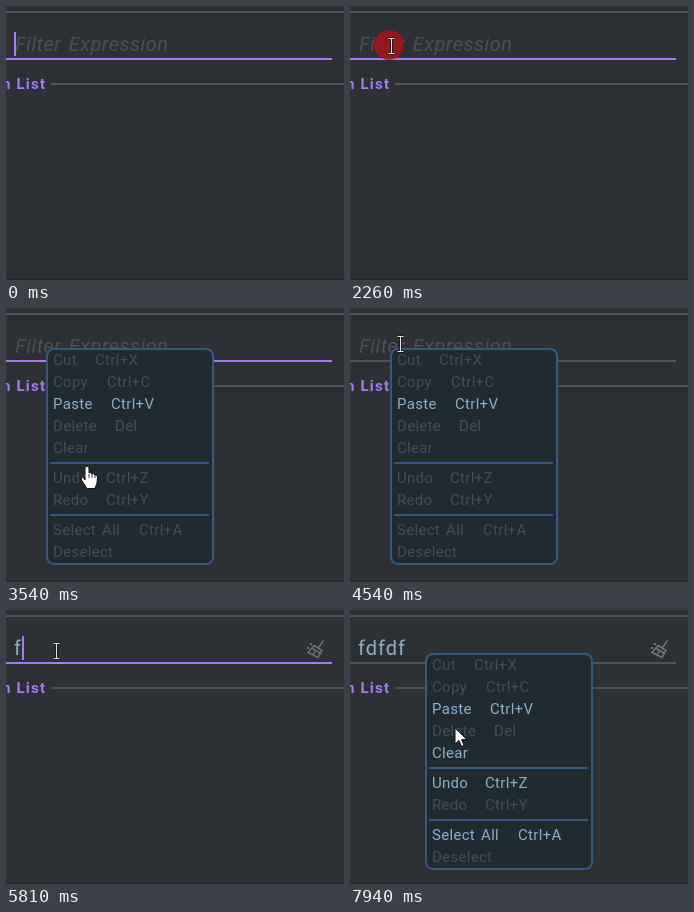
Write an HTML page with a canvas that moves like this. It is 338 by 274 pixels and loops after 8 s.

```html
<!DOCTYPE html>
<html lang="en">
<head>
<meta charset="utf-8">
<title>Filter field</title>
<style>
html, body { margin: 0; width: 100%; height: 100%; overflow: hidden; background: #2d3034; }
canvas { display: block; width: 338px; height: 274px; }
</style>
</head>
<body>
<canvas id="stage" width="338" height="274"></canvas>
<script>
const ctx = document.getElementById('stage').getContext('2d');
const LOOP = 8000;
const PURPLE = '#a57cf4', LINE = '#505357', BLUE = '#8cafca', DIM = '#444e53';

// Pointer: start time, shape, hot spot
const pointer = [
  [0, '', 0, 0],
  [500, 'arrow', 36, 259], [630, 'arrow', 37, 217], [750, 'arrow', 38, 169],
  [880, 'arrow', 39, 122], [1000, 'arrow', 39, 84], [1130, 'beam', 43, 46],
  [1250, 'beam', 47, 30], [1380, 'beam', 38, 47], [1760, 'beam', 41, 40],
  [3020, 'arrow', 42, 41], [3160, 'arrow', 47, 58], [3290, 'arrow', 57, 92],
  [3420, 'arrow', 70, 130], [3540, 'hand', 81, 158], [3670, 'hand', 87, 181],
  [3790, 'hand', 88, 175], [3920, 'arrow', 84, 167], [4040, 'arrow', 92, 92],
  [4170, 'beam', 97, 29], [4420, 'beam', 66, 35], [4540, 'beam', 50, 36],
  [5300, 'beam', 50, 41], [6810, 'beam', 58, 42], [6940, 'beam', 70, 43],
  [7060, 'beam', 76, 43], [7820, 'arrow', 88, 72], [7940, 'arrow', 105, 118]
];
const caretOn = [[0, 130], [630, 1130], [1630, 2260], [2770, 3290],
  [4920, 5430], [5680, 7060], [7680, 7940]];
const blurred = [[3670, 4920], [7940, LOOP]];
const clicks = [[2260, 2510], [4800, 4920], [7190, 7310]];
const keyTimes = [5680, 6190, 6310, 6440, 6560];

const menuItems = [
  ['Cut', 'Ctrl+X', 49, 17], ['Copy', 'Ctrl+C', 61, 39],
  ['Paste', 'Ctrl+V', 65, 61], ['Delete', 'Del', 69, 83],
  ['Clear', '', 0, 105], ['Undo', 'Ctrl+Z', 60, 135],
  ['Redo', 'Ctrl+Y', 60, 157], ['Select All', 'Ctrl+A', 93, 187],
  ['Deselect', '', 0, 209]
];
const menus = [
  { from: 2510, to: 4920, x: 40, y: 40, enabled: ['Paste'] },
  { from: 7310, to: LOOP, x: 75, y: 43, enabled: ['Paste', 'Clear', 'Undo', 'Select All'] }
];

const during = (spans, t) => spans.some(([a, b]) => t >= a && t < b);

function box(x, y, w, h, color) {
  ctx.fillStyle = color;
  ctx.fillRect(x, y, w, h);
}

function setFont(font, spacing, gap = 0) {
  ctx.font = font + ' Roboto, sans-serif';
  ctx.letterSpacing = spacing + 'px';
  ctx.wordSpacing = gap + 'px';
}

function text(s, x, y, color) {
  ctx.fillStyle = color;
  ctx.fillText(s, x, y);
}

function outline(points, close) {
  ctx.beginPath();
  points.forEach(([x, y]) => ctx.lineTo(x, y));
  if (close) ctx.closePath();
}

function drawField(t) {
  const value = 'fdfdf'.slice(0, keyTimes.filter(k => t >= k).length);
  if (value) {
    setFont('20px', 1);
    text(value, 8, 45, BLUE);
    drawBroom(Math.min(1, 0.45 + (t - 5680) / 300));
  } else {
    setFont('italic 20px', 0.5, 2);
    text('Filter Expression', 9, 45, '#4b4e53');
  }
  box(0, 52, 326, 2, during(blurred, t) ? LINE : PURPLE);
  if (during(caretOn, t)) {
    setFont('20px', 1);
    box(Math.round(8 + ctx.measureText(value).width), 26, 2, 24, PURPLE);
  }
}

function drawBroom(alpha) {
  ctx.save();
  ctx.globalAlpha = alpha;
  ctx.strokeStyle = '#74777a';
  ctx.lineWidth = 1.5;
  outline([[317.5, 30.5], [312.5, 37.5]]);
  ctx.stroke();
  outline([[308, 35.5], [316, 40.5], [312, 47.5], [302, 42.5]], true);
  ctx.stroke();
  outline([[306, 38.5], [314.5, 43.5]]);
  ctx.stroke();
  outline([[307, 45], [309, 41.5]]);
  ctx.stroke();
  box(301, 37, 2, 2, '#74777a');
  box(304, 33, 2, 2, '#74777a');
  ctx.restore();
}

function drawMenu({ x, y, enabled }) {
  ctx.save();
  ctx.translate(x, y);
  ctx.beginPath();
  ctx.roundRect(0, 0, 168, 217, 8);
  ctx.fillStyle = '#36577f';
  ctx.fill();
  ctx.beginPath();
  ctx.roundRect(2, 2, 164, 213, 6);
  ctx.fillStyle = '#1f2b30';
  ctx.fill();
  box(4, 114, 159, 2, '#36577f');
  box(4, 166, 159, 2, '#36577f');
  setFont('15px', 0.3, 2);
  for (const [label, keys, keyX, base] of menuItems) {
    const color = enabled.includes(label) ? BLUE : DIM;
    text(label, 7, base, color);
    text(keys, keyX, base, color);
  }
  ctx.restore();
}

const shapes = {
  beam() {
    const stem = () => {
      ctx.beginPath();
      for (const end of [-7.5, 7.5]) {
        ctx.moveTo(-2.5, end);
        ctx.lineTo(3.5, end);
      }
      ctx.moveTo(0.5, -7.5);
      ctx.lineTo(0.5, 7.5);
      ctx.stroke();
    };
    ctx.strokeStyle = '#17191b';
    ctx.lineWidth = 2.6;
    stem();
    ctx.strokeStyle = '#e4e4e4';
    ctx.lineWidth = 1;
    stem();
  },
  arrow() {
    outline([[0, 0], [0, 16], [4, 12.5], [6.5, 18.5], [9, 17.3], [6.6, 11.7], [11.8, 11.5]], true);
    solid();
  },
  hand() {
    ctx.beginPath();
    ctx.moveTo(-2, 14);
    ctx.lineTo(-2, 1.5);
    ctx.quadraticCurveTo(0, -1.5, 2, 1.5);
    ctx.lineTo(2, 7);
    ctx.quadraticCurveTo(4, 5.5, 5, 8);
    ctx.quadraticCurveTo(7, 6.5, 8, 9);
    ctx.quadraticCurveTo(10.5, 8.5, 10.5, 11);
    ctx.lineTo(10, 17);
    ctx.lineTo(8, 22.5);
    ctx.lineTo(0, 22.5);
    ctx.lineTo(-5.5, 14);
    ctx.quadraticCurveTo(-6, 10.5, -3.5, 12);
    ctx.closePath();
    solid();
    ctx.lineWidth = 0.8;
    for (const x of [2, 5, 8]) {
      outline([[x, 8], [x, 12]]);
      ctx.stroke();
    }
  }
};

function solid() {
  ctx.lineJoin = 'round';
  ctx.lineWidth = 1;
  ctx.fillStyle = '#fff';
  ctx.strokeStyle = '#111';
  ctx.fill();
  ctx.stroke();
}

function drawPointer(t) {
  const [, shape, x, y] = pointer.findLast(p => t >= p[0]);
  if (!shape) return;
  ctx.save();
  ctx.translate(x, y);
  if (during(clicks, t)) {
    ctx.beginPath();
    ctx.arc(-2, -1, 15, 0, Math.PI * 2);
    ctx.fillStyle = 'rgba(163, 20, 26, 0.85)';
    ctx.fill();
  }
  shapes[shape]();
  ctx.restore();
}

function draw(t) {
  box(0, 0, 338, 274, '#2d3034');
  box(0, 272, 338, 2, '#29292c');
  box(0, 5, 338, 2, LINE);
  box(45, 77, 293, 2, LINE);
  setFont('bold 15px', 1.2);
  text('n List', -4, 83, PURPLE);
  drawField(t);
  menus.filter(m => t >= m.from && t < m.to).forEach(drawMenu);
  drawPointer(t);
}

const start = performance.now();
function tick() {
  draw((performance.now() - start) % LOOP);
  requestAnimationFrame(tick);
}
tick();
</script>
</body>
</html>
```
